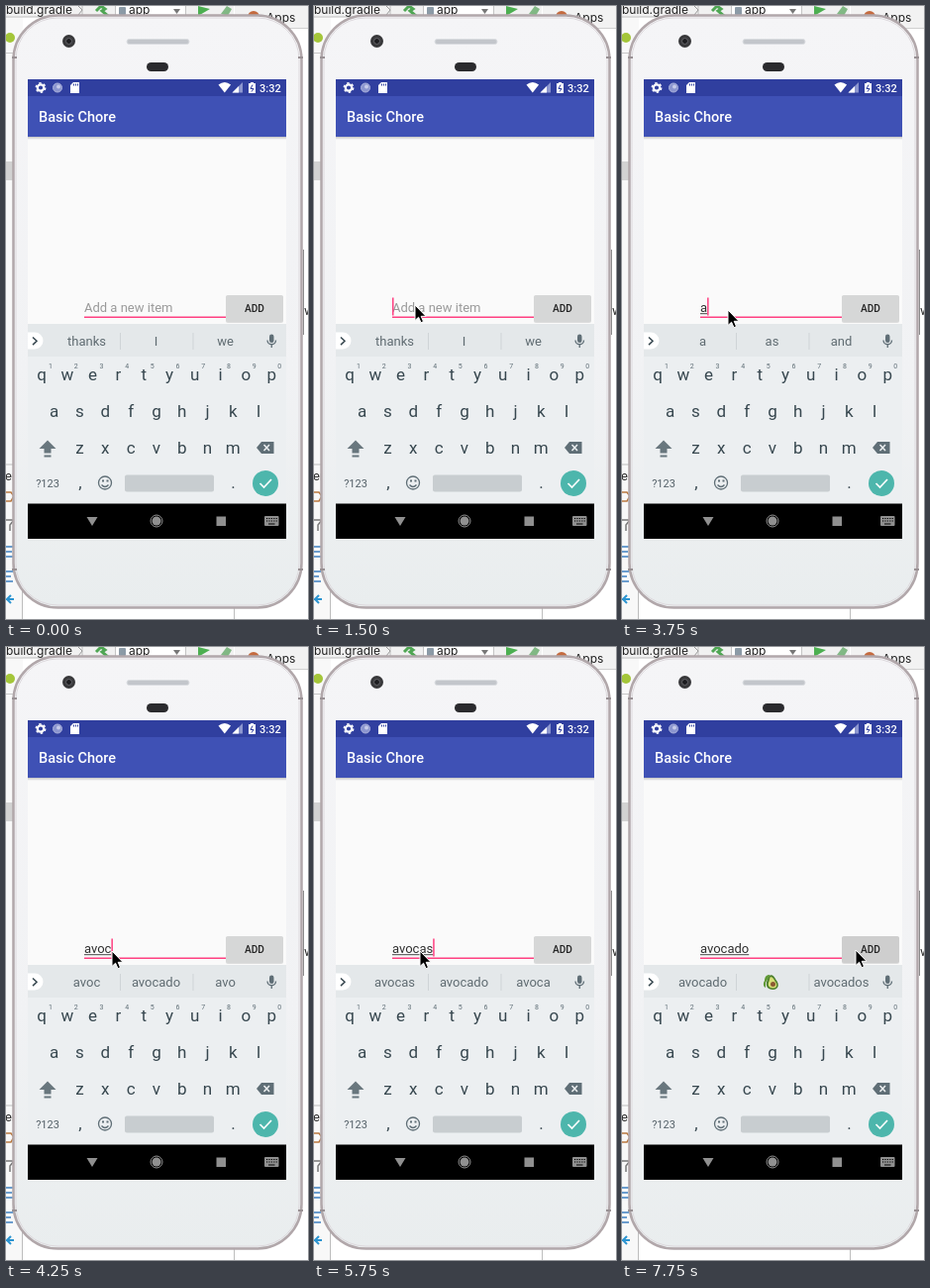
These frames come from a looping animation (305 by 619 pixels, 8 s). An HTML page:

```html
<!DOCTYPE html>
<html lang="en">
<head>
<meta charset="utf-8">
<title>Todo app</title>
<style>
html, body { margin: 0; width: 100%; height: 100%; overflow: hidden; background: #fff; }
svg { display: block; width: 305px; height: 619px; font-family: Roboto, sans-serif; }
.ui { font-family: Inter, "Liberation Sans", sans-serif; font-size: 12px; fill: #222; }
.mid { text-anchor: middle; }
.bold { font-weight: 500; }
.key { font-size: 17px; fill: #37474f; }
.digit { font-size: 7px; fill: #5f6e76; }
.word { font-size: 13px; fill: #5f6b71; }
.entry { font-size: 13px; fill: #303030; white-space: pre; }
</style>
</head>
<body>
<svg viewBox="0 0 305 619">
  <defs>
    <linearGradient id="shell" x2="0" y2="1">
      <stop stop-color="#f5f5f7"/><stop offset=".6" stop-color="#f1f2f4"/><stop offset="1" stop-color="#e9edee"/>
    </linearGradient>
    <linearGradient id="shade" x2="0" y2="1">
      <stop stop-color="#000" stop-opacity=".22"/><stop offset="1" stop-color="#000" stop-opacity="0"/>
    </linearGradient>
  </defs>

  <!-- desktop behind the phone -->
  <rect width="305" height="619" fill="#fff"/>
  <rect width="230" height="11" fill="#f1f1f1"/>
  <rect y="10" width="17" height="609" fill="#f8f8f8"/>
  <rect y="157" width="9" height="19" fill="#d2d2d2"/>
  <path d="M0 11H77V0M0 463H17M16.500 463V619M230.500 606V619" fill="none" stroke="#bdbdbd"/>
  <text class="ui" x="0" y="8">build.gradle</text>
  <path d="M73 0l4 4-4 5" fill="none" stroke="#999"/>
  <path d="M91 5l5-5 4 3-3 2 7 6" fill="none" stroke="#4fa653" stroke-width="3"/>
  <path d="M110.500 0V11H181.500V0" fill="#fff" stroke="#c4c4c4"/>
  <rect x="114" y="1" width="7" height="8" rx="1" fill="#8b9aa6"/>
  <text class="ui" x="124" y="8">app</text>
  <path d="M169 3h7l-3.500 5z" fill="#777"/>
  <path d="M194 0l12 3-12 7z" fill="#4caf50"/>
  <path d="M217 8l6-8 5 3-4 7z" fill="#81b884"/>
  <path d="M231 0H305V22H231z" fill="#f2f2f2"/>
  <circle cx="250" cy="11" r="6" fill="#c46a3e"/>
  <text class="ui" x="263" y="16">Apps</text>
  <path d="M231 22.500H305" stroke="#cfcfcf"/>
  <circle cx="4" cy="32" r="5" fill="#a4c639"/>
  <path d="M0 47.500H10" stroke="#c8c8c8"/>
  <path d="M300.500 246V332" stroke="#8b8b8b"/>
  <text class="ui" x="301" y="312">w</text>
  <text class="ui" x="-1" y="479" fill="#555">er</text>
  <g fill="none" stroke-width="1.500">
    <path d="M0 491h5l3 4-3 5H0" stroke="#b9783f"/>
    <path d="M0 519h8l-4 5v6" stroke="#777"/>
    <path d="M0 546h8M0 551h6M0 556h8M0 571h7M0 576h5M0 581h7" stroke="#3d7fc0"/>
    <path d="M8 599H1l4-4M1 599l4 4" stroke="#2b94d1" stroke-width="2"/>
  </g>

  <!-- phone -->
  <rect x="7.500" y="9.500" width="291" height="598" rx="45" fill="url(#shell)" stroke="#b1a7aa" stroke-width="2.500"/>
  <rect x="10" y="12" width="286" height="593" rx="42" fill="none" stroke="#dedade"/>
  <path d="M6 52h5M295 52h5M6 569h5M295 569h5" stroke="#999194" stroke-width="2"/>
  <circle cx="63.500" cy="35.500" r="6.500" fill="#38383a"/>
  <circle cx="63.500" cy="35.500" r="3" fill="#1d1d20" stroke="#66666b"/>
  <rect x="122" y="33.500" width="63" height="5" rx="2.500" fill="#c3c6cb" stroke="#dadce0"/>
  <rect x="142" y="57" width="22" height="9" rx="4.500" fill="#2b2b2e"/>

  <!-- app -->
  <rect x="22" y="74" width="261" height="464" fill="#fafafa"/>
  <rect x="22" y="74" width="261" height="17" fill="#303f9f"/>
  <rect x="22" y="91" width="261" height="41" fill="#3f51b5"/>
  <rect x="22" y="132" width="261" height="3" fill="url(#shade)"/>
  <circle cx="35" cy="82.500" r="3.200" fill="none" stroke="#fff" stroke-width="2.200"/>
  <circle cx="35" cy="82.500" r="4.700" fill="none" stroke="#fff" stroke-width="1.500" stroke-dasharray="2.460"/>
  <circle cx="52" cy="82.500" r="4.500" fill="#8c96cf" stroke="#aab1dc"/>
  <circle cx="53" cy="81.500" r="2" fill="#c5cae9"/>
  <path d="M65 80l3-3h6v11h-9z" fill="#fff"/>
  <path d="M68.500 78.500v2m2-2v2m2-2v2" stroke="#303f9f"/>
  <path d="M214.500 79.500q6.300-5 12.600 0l-6.300 8z" fill="#fff"/>
  <path d="M239 77v10.500h-10.500z" fill="#8c96cf"/>
  <path d="M235 81v6.500h-6.500z" fill="#fff"/>
  <path d="M245 78h2v-1h3v1h2v10h-7z" fill="#fff"/>
  <path d="M249 79.500l-2 4h3l-2 3" fill="none" stroke="#303f9f"/>
  <text class="bold" x="256" y="86.500" font-size="11" fill="#fff">3:32</text>
  <text class="bold" x="33" y="117" font-size="14.500" fill="#fff">Basic Chore</text>

  <text id="hint" class="entry" x="79" y="308.500" style="fill:#9a9a9a">Add a new item</text>
  <text id="entry" class="entry" x="79" y="308.500"></text>
  <rect id="compose" x="79" y="310.200" height="1" fill="#444"/>
  <rect x="79" y="313.500" width="143" height="1.500" fill="#ff4081"/>
  <rect id="caret" y="294.500" width="1.500" height="18" fill="#ff4081"/>
  <rect x="222" y="292.500" width="58" height="27.500" rx="2" fill="#000" opacity=".12"/>
  <rect id="button" x="222" y="292" width="58" height="27" rx="2"/>
  <text class="mid bold" x="251" y="309" font-size="10.150" fill="#222">ADD</text>

  <!-- keyboard -->
  <rect x="22" y="321" width="261" height="182" fill="#eceff1"/>
  <rect x="22" y="321" width="261" height="33" fill="#e4e8ea"/>
  <path d="M22 329.500h7a8.500 8.500 0 0 1 0 17h-7z" fill="#fff"/>
  <path d="M27 334.500l4 3.800-4 3.800" fill="none" stroke="#37474f" stroke-width="1.500"/>
  <path d="M115.500 330v17M189 330v17" stroke="#cfd4d7"/>
  <g id="words"></g>
  <g id="avocado">
    <path d="M148.500 332c3-2 5 .5 7 4 4 4.500 2.500 10-3 10s-8-4-6-9z" fill="#4d7f2c"/>
    <path d="M149.500 333.500c2-1 3.500 1 5 4 3 3.500 2 7-2 7s-6-3-4-7z" fill="#d6df78"/>
    <circle cx="152.500" cy="340.500" r="2.500" fill="#8d5a33"/>
    <path d="M145 339c2-4 4-5 4-8-3 0-5 2-5 6-2 3-1 6 1 7z" fill="#5f9936"/>
  </g>
  <rect x="266" y="331.500" width="4.500" height="8.500" rx="2.250" fill="#5f6e76"/>
  <path d="M264 337.500a4.250 4.250 0 0 0 8.500 0M268.250 342v3" fill="none" stroke="#5f6e76" stroke-width="1.300"/>
  <g id="keys"></g>
  <path d="M42 438.500l8.500 8.500h-5v4.500h-7V447h-5z" fill="#69777e"/>
  <rect x="38.500" y="453.500" width="7" height="2" fill="#69777e"/>
  <path d="M258 440h12.500v12H258l-5-6z" fill="#5f6e76"/>
  <path d="M260.500 443l5.500 6m0-6l-5.500 6" stroke="#eceff1" stroke-width="1.500"/>
  <text class="mid" x="42" y="486" font-size="11" fill="#546068">?123</text>
  <g fill="none" stroke="#5f6e76" stroke-width="1.300">
    <circle cx="100" cy="481.500" r="6.500"/>
    <path d="M96.500 483.500q3.500 4 7 0"/>
  </g>
  <path d="M97 478.500h2v2h-2zM101.500 478.500h2v2h-2z" fill="#5f6e76"/>
  <rect x="120" y="473.500" width="90" height="17" rx="2" fill="#c8cdd0"/>
  <circle cx="262" cy="482" r="13" fill="#4db6ac"/>
  <path d="M256.500 482l4 4 7.500-8" fill="none" stroke="#fff" stroke-width="1.700"/>

  <!-- navigation bar -->
  <rect x="22" y="502.500" width="261" height="35.500" fill="#000"/>
  <g fill="#909090">
    <path d="M81.500 516h11l-5.500 9z"/>
    <circle cx="152" cy="520" r="4.500"/>
    <circle cx="152" cy="520" r="6" fill="none" stroke="#909090"/>
    <rect x="212.500" y="515.500" width="9.500" height="9.500"/>
    <rect x="261" y="515" width="14.500" height="10" rx="1"/>
  </g>
  <path d="M263 517.500h11M263 520h11" stroke="#000" stroke-width="1.200" stroke-dasharray="1.200"/>
  <path d="M265 523h6.500" stroke="#000"/>

  <path id="mouse" d="M0 0V15.500L3.600 12.200 6 17.700 8.500 16.600 6.200 11.300H11Z" fill="#000" stroke="#fff"/>
</svg>
<script>
const $ = id => document.getElementById(id);
const LOOP = 8000, LEFT = 79;

function addText(parent, cls, x, y, str) {
  const el = document.createElementNS('http://www.w3.org/2000/svg', 'text');
  el.setAttribute('class', cls + ' mid');
  el.setAttribute('x', x);
  el.setAttribute('y', y);
  el.textContent = str;
  return parent.appendChild(el);
}

const addRow = (letters, x, y) =>
  [...letters].forEach((c, i) => addText($('keys'), 'key', x + i * 25.8, y, c));
addRow('qwertyuiop', 36, 378);
addRow('asdfghjkl', 48.7, 415);
addRow('zxcvbnm', 74.5, 452);
addText($('keys'), 'key', 75, 487, ',');
addText($('keys'), 'key', 229.5, 487, '.');
[...'1234567890'].forEach((c, i) => addText($('keys'), 'digit', 45 + i * 25.7, 366, c));
const words = [81.5, 151.5, 221.5].map(x => addText($('words'), 'word', x, 343, ''));

// Each step lists only what changes at that time.
const steps = [
  [0, { text: '', caret: 0, mouse: null, words: 'thanks I we', pressed: false }],
  [500, { caret: 1, mouse: [257, 266] }],
  [750, { mouse: [166, 304] }],
  [1000, { caret: 0, mouse: [82, 340] }],
  [1250, { mouse: [102, 302] }],
  [1500, { caret: 1 }],
  [1750, { mouse: [106, 307] }],
  [2000, { caret: 0, mouse: [107, 307] }],
  [2500, { caret: 1 }],
  [3000, { caret: 0 }],
  [3500, { caret: 1 }],
  [3750, { text: 'a', words: 'a as and' }],
  [4000, { text: 'av', words: 'av average ave' }],
  [4250, { text: 'avoc', words: 'avoc avocado avo' }],
  [4500, { text: 'avoca', words: 'avoca avocado avocats' }],
  [4750, { text: 'avocas', words: 'avocas avocado avoca' }],
  [5250, { caret: 0 }],
  [5750, { caret: 1 }],
  [6250, { caret: 0, mouse: [137, 307] }],
  [6500, { text: 'avoca', caret: 1 }],
  [6750, { text: 'avocad', words: 'avocad avocado avocados' }],
  [7000, { text: 'avocado', words: 'avocado * avocados' }],
  [7250, { mouse: [236, 304] }],
  [7500, { caret: 0, pressed: true }],
  [7750, { mouse: [236, 306] }]
];

const show = (el, on) => el.setAttribute('visibility', on ? 'visible' : 'hidden');

function draw(s) {
  $('entry').textContent = s.text;
  const width = s.text ? $('entry').getComputedTextLength() : 0;
  show($('hint'), !s.text);
  $('compose').setAttribute('width', width);
  $('caret').setAttribute('x', LEFT + width);
  show($('caret'), s.caret);
  s.words.split(' ').forEach((w, i) => words[i].textContent = w === '*' ? '' : w);
  show($('avocado'), s.words.includes('*'));
  $('button').setAttribute('fill', s.pressed ? '#cecece' : '#d6d7d7');
  show($('mouse'), s.mouse);
  if (s.mouse) $('mouse').setAttribute('transform', `translate(${s.mouse})`);
}

let last = -1;
function tick() {
  const t = performance.now() % LOOP;
  const past = steps.filter(([at]) => at <= t);
  if (past.length !== last) {
    last = past.length;
    draw(Object.assign({}, ...past.map(([, change]) => change)));
  }
  requestAnimationFrame(tick);
}
tick();
</script>
</body>
</html>
```
